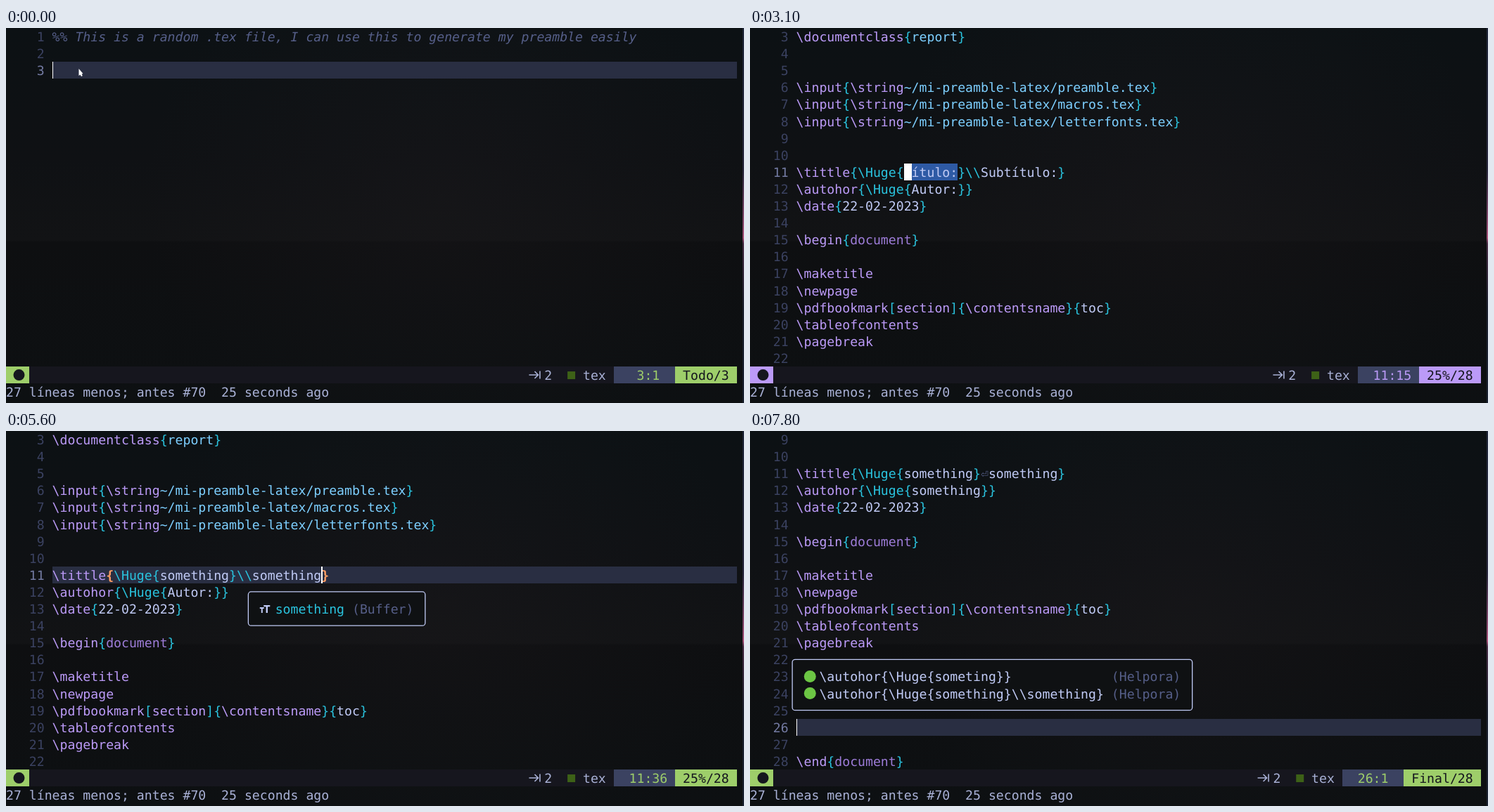
Animation of 1049 by 534 pixels, one loop 8 s. Source, as an HTML page with a canvas:

```html
<!DOCTYPE html>
<html lang="es">
<head>
<meta charset="utf-8">
<title>Snippet demo</title>
<style>
html, body { margin: 0; width: 100%; height: 100%; overflow: hidden; background: #0e1013; }
canvas { display: block; }
</style>
</head>
<body>
<canvas id="stage" width="1049" height="534"></canvas>
<script>
const ctx = document.getElementById('stage').getContext('2d');
const W = 1049, H = 534, LOOP = 8000;
const CW = 10.933, CH = 24.1, COLS = 95, GUTTER = 6;
const FONT = '18.16px "DejaVu Sans Mono", "Noto Sans Mono", monospace';
const C = {
  fg: '#c0caf5', soft: '#a9b1d6', dim: '#565f89', number: '#3b4261', current: '#737aa2',
  purple: '#bb9af7', violet: '#9d7cd8', cyan: '#2ac3de', blue: '#7dcfff', orange: '#ff9e64',
  green: '#9ece6a', row: '#292e42', bar: '#16161e', select: '#2e5aa5', dark: '#15161e'
};

const COMMENT = '%% This is a random .tex file, I can use this to generate my preamble easily';
const MESSAGE = '27 líneas menos; antes #70  25 seconds ago';
const ASSISTANT = '(Helpora)';

// Key press times; a repeated time means two keys within one step.
const KEYS = {
  draft: [500, 700, 800, 900, 1000, 1100, 1200, 1300, 1400, 1800, 2200, 2300, 2400],
  title: [3600, 3700, 3800, 3900, 3900, 4100, 4200, 4200, 4300],
  subtitle: [4900, 5000, 5100, 5200, 5300, 5500, 5500, 5600, 5600],
  author: [6700, 6800, 6900, 7000, 7100, 7200, 7300, 7400, 7400]
};
const typed = (word, keys, t) => word.slice(0, keys.filter(k => t >= k).length);

// Fills whole cells, with edges on whole pixels.
function box(col, row, cols, color) {
  const x = Math.round(col * CW), y = Math.round(row * CH);
  ctx.fillStyle = color;
  ctx.fillRect(x, y, Math.round((col + cols) * CW) - x, Math.round((row + 1) * CH) - y);
}

function print(str, col, row, color, style = '') {
  ctx.font = style + ' ' + FONT;
  ctx.fillStyle = color;
  [...str].forEach((ch, i) => {
    if (ch !== ' ') ctx.fillText(ch, (col + i) * CW, row * CH + 19);
  });
}

function dot(x, y, r, color) {
  ctx.fillStyle = color;
  ctx.beginPath();
  ctx.arc(x, y, r, 0, 7);
  ctx.fill();
}

function gradient(g, stops) {
  stops.forEach(([at, color]) => g.addColorStop(at, color));
  return g;
}

const backdrop = gradient(ctx.createLinearGradient(0, 0, 0, H), [
  [0, '#0c1114'], [.35, '#0f1114'], [.565, '#121315'], [.572, '#0e0f11'], [1, '#0d1012']]);
const glow = gradient(ctx.createRadialGradient(620, 240, 0, 620, 240, 420), [
  [0, 'rgba(40,34,38,.2)'], [1, 'rgba(40,34,38,0)']]);
const edge = gradient(ctx.createLinearGradient(0, 0, 0, H), [
  [0, '#20273a'], [.38, '#2b2a40'], [.5, '#7b4568'], [.56, '#a8527a'], [.575, '#4a3048'], [.75, '#1d2230'], [1, '#1a2130']]);

function background() {
  for (const paint of [backdrop, glow]) {
    ctx.fillStyle = paint;
    ctx.fillRect(0, 0, W, H);
  }
  ctx.fillStyle = edge;
  ctx.fillRect(1047, 0, 2, H);
}

function code(line, row) {
  const arg = /^\\(documentclass|input)/.test(line) ? C.blue
    : /^\\(begin|end)/.test(line) ? C.violet : C.fg;
  let col = GUTTER;
  for (const tok of line.match(/\\\\|\\\w+|[{}[\]⏎]|[^\\{}[\]⏎]+/g) || []) {
    const color = tok === '⏎' ? C.dim
      : /^(\\Huge|\\\\|[{}[\]])$/.test(tok) ? C.cyan
      : tok[0] === '\\' || tok === 'section' ? C.purple : arg;
    print(tok, col, row, color);
    col += tok.length;
  }
}

function textIcon(col, row) {
  const x = col * CW, y = row * CH + 7;
  ctx.fillStyle = C.fg;
  ctx.fillRect(x, y + 3, 6, 2);
  ctx.fillRect(x + 2, y + 3, 2, 8);
  ctx.fillRect(x + 5.5, y, 9, 2.2);
  ctx.fillRect(x + 8.8, y, 2.4, 11);
}

function popup(col, row, cols, items) {
  ctx.beginPath();
  ctx.roundRect((col + .5) * CW, (row + .5) * CH, cols * CW, (items.length + 1) * CH, 4);
  ctx.fillStyle = '#0f1113';
  ctx.fill();
  ctx.strokeStyle = C.fg;
  ctx.lineWidth = 1.3;
  ctx.stroke();
  items.forEach(({ text, match = 0, from }, i) => {
    const y = row + 1 + i;
    if (from === ASSISTANT) dot((col + 2.8) * CW, (y + .5) * CH, 8.5, '#6cc644');
    else textIcon(col + 2, y);
    print(text.slice(0, match), col + 4, y, C.cyan);
    print(text.slice(match), col + 4 + match, y, C.fg);
    print(from, col + cols - 1 - from.length, y, C.dim);
  });
}

// Completion from the buffer, for a word that starts at the given column.
function wordPopup(word, col, row, match) {
  popup(col - 1, row + 1, word.length + 14, [{ text: word, match, from: '(Buffer)' }]);
}

function status(line, column, progress, color) {
  const last = COLS - progress.length - 2, pos = last - 8;
  const y = 20.5 * CH;
  box(0, 20, COLS, C.bar);
  box(0, 20, 3, color);
  dot(18.5, y, 8, C.dark);

  const x = (pos - 11) * CW;
  ctx.strokeStyle = C.soft;
  ctx.lineWidth = 1.6;
  ctx.beginPath();
  ctx.moveTo(x, y); ctx.lineTo(x + 13, y);
  ctx.moveTo(x + 8, y - 5); ctx.lineTo(x + 13, y); ctx.lineTo(x + 8, y + 5);
  ctx.moveTo(x + 15.5, y - 5.5); ctx.lineTo(x + 15.5, y + 5.5);
  ctx.stroke();
  print('2', pos - 9, 20, C.soft);
  ctx.fillStyle = '#3d6117';
  ctx.fillRect((pos - 6) * CW, y - 5, 11, 11);
  print('tex', pos - 4, 20, C.soft);

  box(pos, 20, 8, C.number);
  print(String(line).padStart(3) + ':' + column, pos + 1, 20, color);
  box(last, 20, progress.length + 2, color);
  print(progress, last + 1, 20, C.dark);
  print(MESSAGE, 0, 21, C.soft);
}

function pointer() {
  ctx.fillStyle = '#fff';
  ctx.beginPath();
  [[103.5, 58], [103.5, 68], [105.5, 66.5], [107, 69], [108.8, 68], [107.6, 65.5], [109.5, 65]]
    .forEach(p => ctx.lineTo(...p));
  ctx.fill();
}

function documentLines(title, subtitle, author, conceal) {
  const lines = Array(29).fill('');
  const put = (n, ...rows) => rows.forEach((r, i) => lines[n + i] = r);
  const path = name => `\\input{\\string~/mi-preamble-latex/${name}.tex}`;
  put(3, '\\documentclass{report}');
  put(6, ...['preamble', 'macros', 'letterfonts'].map(path));
  put(11, `\\tittle{\\Huge{${title}}${conceal ? '⏎' : '\\\\'}${subtitle}}`,
    `\\autohor{\\Huge{${author}}}`, '\\date{22-02-2023}');
  put(15, '\\begin{document}');
  put(17, '\\maketitle', '\\newpage', '\\pdfbookmark[section]{\\contentsname}{toc}',
    '\\tableofcontents', '\\pagebreak');
  put(28, '\\end{document}');
  return lines;
}

// Everything the editor shows at time t.
function editor(t) {
  if (t < 3100) {
    const draft = typed('generate-prea', KEYS.draft, t);
    return {
      lines: ['', COMMENT, '', draft], first: 1, line: 3, column: draft.length + 1, progress: 'Todo/3',
      popup: t >= 600 && t < 1400 && (() => wordPopup('generate', GUTTER, 2, draft.length))
    };
  }
  const word = key => typed('something', KEYS[key], t);
  const title = word('title') || 'Título:';
  const subtitle = word('subtitle') || 'Subtítulo:';
  const author = word('author') || 'Autor:';
  const lines = documentLines(title, subtitle, author, t >= 6100);
  if (t >= 7800) {
    return {
      lines, first: 9, line: 26, column: 1, progress: 'Final/28',
      popup: () => popup(5, 13, 52, [
        { text: '\\autohor{\\Huge{someting}}', from: ASSISTANT },
        { text: '\\autohor{\\Huge{something}\\\\something}', from: ASSISTANT }])
    };
  }
  // start: offset of the edited word; open: offset of the brace around it
  const [key, line, start, open, text] = t < 4700 ? ['title', 11, 14, 13, title]
    : t < 6100 ? ['subtitle', 11, 26, 7, subtitle] : ['author', 12, 15, 14, author];
  const done = word(key).length;
  return {
    lines, first: 3, line, progress: '25%/28', open,
    column: start + done + 1,
    selected: done ? 0 : text.length,
    popup: key !== 'title' && done > 1 && (() => wordPopup('something', GUTTER + start, line - 3, done))
  };
}

function brace(ch, col, row) {
  box(col, row, 1, C.row);
  print(ch, col, row, C.orange, 'bold');
}

function draw(t) {
  const e = editor(t), row = e.line - e.first, col = GUTTER + e.column - 1;
  background();
  if (e.selected) box(col, row, e.selected, C.select);
  else box(GUTTER, row, COLS - GUTTER, C.row);

  for (let n = e.first; n < e.lines.length && n < e.first + 20; n++) {
    const y = n - e.first;
    print(String(n).padStart(2), 3, y, n === e.line ? C.current : C.number);
    if (e.lines[n] === COMMENT) print(COMMENT, GUTTER, y, C.dim, 'italic');
    else code(e.lines[n], y);
  }

  if (e.selected) {
    box(col, row, 1, '#fff');
  } else {
    if (e.open) {
      brace('{', GUTTER + e.open, row);
      brace('}', col, row);
    }
    box(col, row, .15, '#fff');
  }
  if (e.popup) e.popup();
  status(e.line, e.column, e.progress, e.selected ? C.purple : C.green);
  if (t < 500) pointer();
}

function frame(now) {
  draw(now % LOOP);
  requestAnimationFrame(frame);
}
ctx.textRendering = 'geometricPrecision';
requestAnimationFrame(frame);
</script>
</body>
</html>
```
